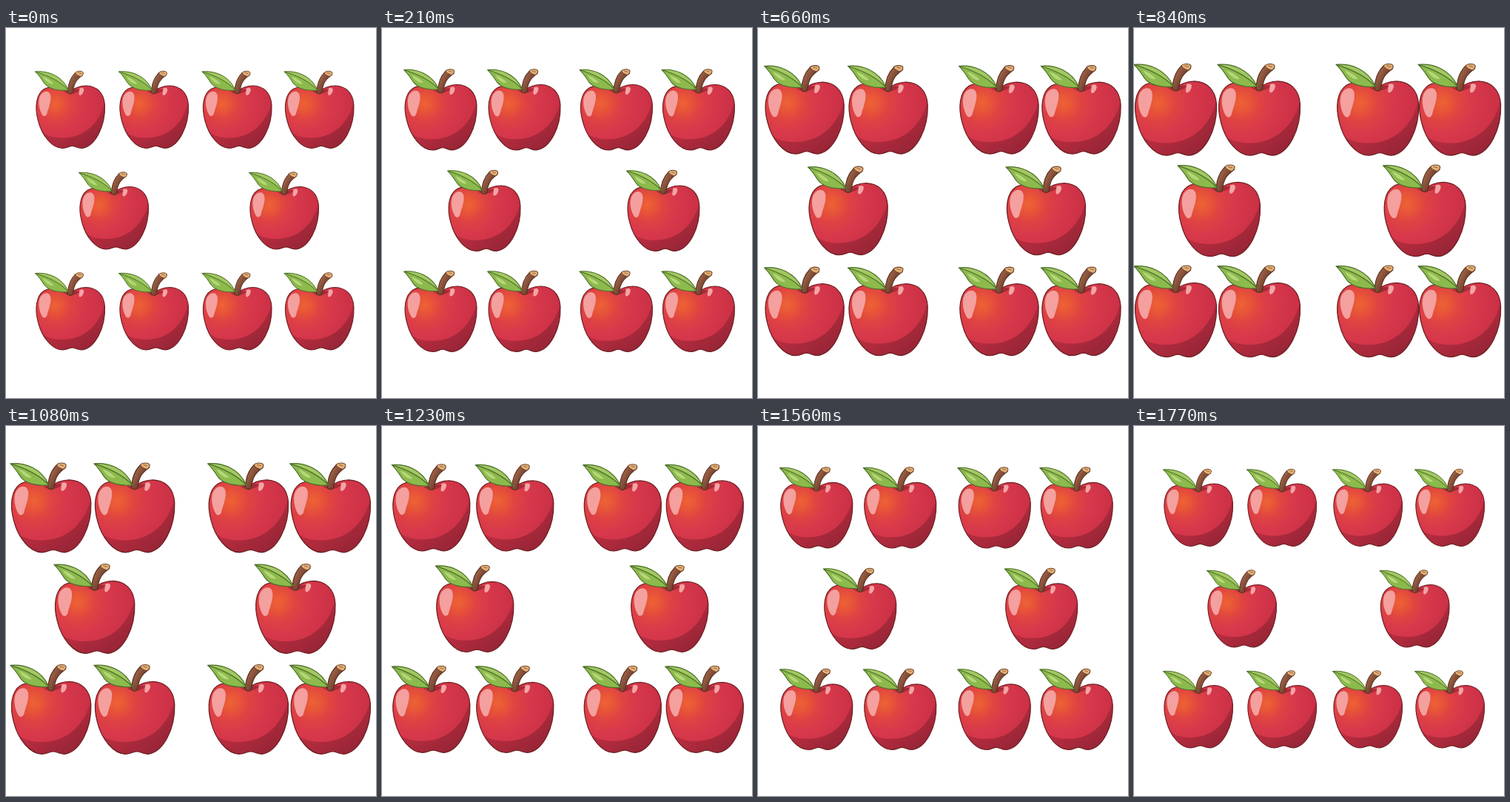
Recreate the animation shown at these times as an HTML page. Size 500x500 px, loop 1.8 s.

```html
<!DOCTYPE html>
<html lang="en">
<head>
<meta charset="utf-8">
<title>Apples</title>
<style>
html, body { margin: 0; width: 100%; height: 100%; overflow: hidden; background: #fff; }
svg { display: block; width: 100%; height: 100%; }
</style>
</head>
<body>
<svg viewBox="0 0 500 500">
  <defs>
    <radialGradient id="skin" gradientUnits="userSpaceOnUse" cx="-20" cy="-8" r="66">
      <stop offset="0" stop-color="#ed6236"/>
      <stop offset=".14" stop-color="#e85637"/>
      <stop offset=".32" stop-color="#df4342"/>
      <stop offset=".55" stop-color="#d8394b"/>
      <stop offset="1" stop-color="#cb3046"/>
    </radialGradient>
    <linearGradient id="shade" gradientUnits="userSpaceOnUse" x1="5" y1="5" x2="34" y2="44">
      <stop offset="0" stop-color="#b92d40"/>
      <stop offset="1" stop-color="#962536"/>
    </linearGradient>
    <linearGradient id="bark" gradientUnits="userSpaceOnUse" x1="-2" y1="-40" x2="9" y2="-34">
      <stop offset="0" stop-color="#a5674b"/>
      <stop offset="1" stop-color="#74412f"/>
    </linearGradient>
    <path id="body" d="M-2-24C-9-30-24-34-35-28C-46-21-48-3-43 15C-38 35-24 52-10 52C-4 52-1 49 3 49C7 49 10 52 16 52C34 50 48 22 47-6C46-24 35-32 22-32.500C11-32.500 5-28-2-24Z"/>
    <clipPath id="inside"><use href="#body"/></clipPath>
    <g id="apple" stroke-linecap="round" stroke-linejoin="round">
      <use href="#body" fill="url(#skin)"/>
      <path clip-path="url(#inside)" fill="url(#shade)" d="M48-18C44 14 22 38-10 38C-21 38-30 36-38 30L-20 56H50Z"/>
      <path d="M-9-26C-6-21 8-20 13-27C8-29 3-27-2-24Z" fill="#a52b38"/>
      <path d="M-38-22C-44-17-43-3-38 6C-36 10-32 9-31 5C-29-3-26-9-26-17C-26-25-33-27-38-22Z" fill="#f3a09f"/>
      <path d="M13-29C18-31 20-28 18-24C16-19 12-18 12-22Z" fill="#f3a5a5"/>
      <use href="#body" fill="none" stroke="#6d2023" stroke-width="1.1"/>
      <path d="M-3-23C-3-35 1-44 7-50L17.500-47C11-42 5-38 4-23C2-21-1-21-3-23Z" fill="url(#bark)" stroke="#55301f" stroke-width="1"/>
      <path d="M7-50C9-53 17-53 18-50C18-47 16-45 14-45C11-46 8-47 7-50Z" fill="#e2b078" stroke="#70452b" stroke-width="1"/>
      <path d="M11-50L15-49" stroke="#a66d43" stroke-width="1"/>
      <path d="M-47-51.500C-31-53-11-47-2-26.500C-15-25-29-28-35-36C-39-42-42-47-47-51.500Z" fill="#8cba4c"/>
      <path d="M-47-51.500C-31-53-11-47-2-26.500C-14-40-27-45-47-51.500Z" fill="#a3c862"/>
      <path d="M-37-45C-31-43-25-39-22-35C-27-34-33-38-37-45Z" fill="#b6d67a"/>
      <path d="M-47-51.500C-31-53-11-47-2-26.500C-15-25-29-28-35-36C-39-42-42-47-47-51.500C-29-46-14-39-2-26.500" fill="none" stroke="#4b6d2b" stroke-width="1"/>
    </g>
  </defs>
  <g id="stage"></g>
</svg>
<script>
const LOOP = 1800, STEP = 30, HALF = 30, LAST = 59;
const stage = document.getElementById('stage');

// Each group holds four corner apples and one in the middle.
const layout = (left, right, middle) => [
  [left, 110.5], [right, 110.5], [middle, 247], [left, 383], [right, 383]
];
const addApple = ([x, y]) => {
  const node = document.createElementNS('http://www.w3.org/2000/svg', 'use');
  node.setAttribute('href', '#apple');
  stage.append(node);
  return { node, x, y };
};
const leftGroup = layout(86.5, 199.5, 145.5).map(addApple);
const rightGroup = layout(312, 423, 375.5).map(addApple);

function place(group, shift, scale) {
  for (const { node, x, y } of group) {
    node.setAttribute('transform', `translate(${x + shift} ${y}) scale(${scale})`);
  }
}

function draw(time) {
  const step = Math.floor((time % LOOP) / STEP);
  const rising = step <= HALF;
  const p = rising ? step / HALF : (LAST - step) / (LAST - HALF);
  const scale = 1 + 0.2 * p;
  place(leftGroup, -33 * p, scale);
  // The right group comes back to a slightly wider resting place.
  place(rightGroup, rising ? 18 * p : 3.5 + 14.5 * p, scale);
}

const start = performance.now();
function tick() {
  draw(performance.now() - start);
  requestAnimationFrame(tick);
}
draw(0);
requestAnimationFrame(tick);
</script>
</body>
</html>
```
